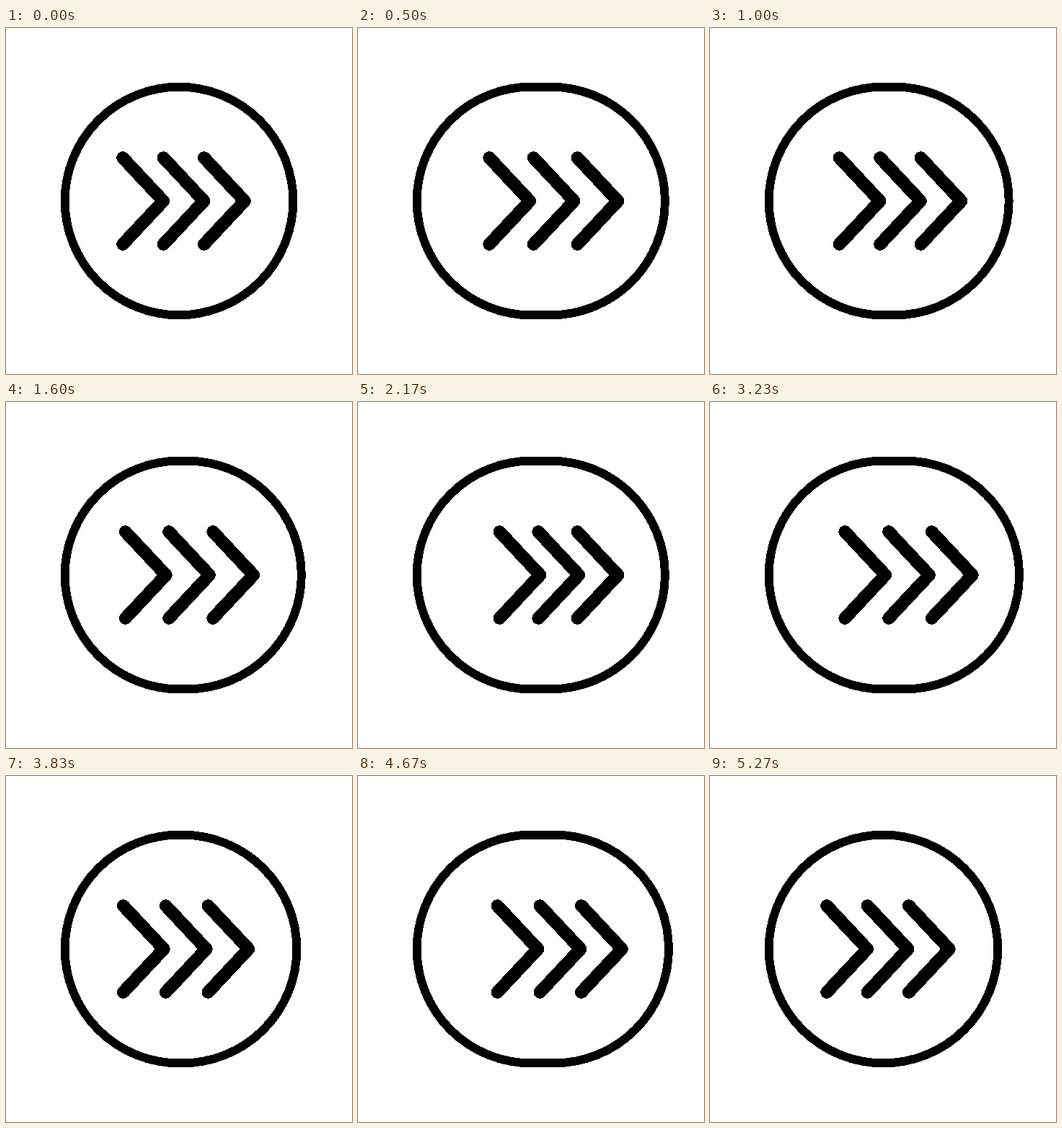
Recreate the animation shown at these times as an HTML page. Size 480 by 480 pixels, loop 5310 ms.

```html
<!DOCTYPE html>
<html lang="en">
<head>
<meta charset="utf-8">
<title>Stretching arrow button</title>
<style>
  html, body { margin: 0; width: 100%; height: 100%; overflow: hidden; background: #fff; }
  svg { display: block; width: 480px; height: 480px; }
</style>
</head>
<body>
<svg viewBox="0 0 480 480" fill="none" stroke="#000" shape-rendering="crispEdges">
  <rect id="ring" x="81.7" y="81.7" width="316.6" height="316.6" rx="158.3" stroke-width="11.9"/>
  <g stroke-width="17.6" stroke-linecap="round" stroke-linejoin="round">
    <path class="arrow" d="M162 180l56.2 60l-56.2 60"/>
    <path class="arrow" d="M218.4 180l56.2 60l-56.2 60"/>
    <path class="arrow" d="M274.8 180l56.2 60l-56.2 60"/>
  </g>
</svg>
<script>
const LOOP = 5310, STEPS = 159, CYCLE = 40;
const ring = document.getElementById('ring');
const arrows = [...document.querySelectorAll('.arrow')];

const ease = x => {
  x = Math.min(1, Math.max(0, x));
  return x * x * (3 - 2 * x);
};

// Out and back within one cycle; a lag delays the start and brings the end forward.
const swing = (step, lag) => {
  const peak = CYCLE / 2 + lag;
  return step < peak
    ? ease((step - lag) / (CYCLE / 2))
    : 1 - ease((step - peak) / (CYCLE - lag - peak));
};

function draw(now) {
  // The motion runs in 30 steps per second.
  const step = Math.min(STEPS - 1, Math.floor((now % LOOP + 4) * 0.03)) % CYCLE;
  ring.setAttribute('width', 316.6 + 32.7 * swing(step, 0));
  arrows.forEach((arrow, i) => {
    arrow.setAttribute('transform', `translate(${35 * swing(step, 4 - 2 * i)})`);
  });
}

const start = performance.now();
function tick() {
  draw(performance.now() - start);
  requestAnimationFrame(tick);
}
tick();
</script>
</body>
</html>
```
